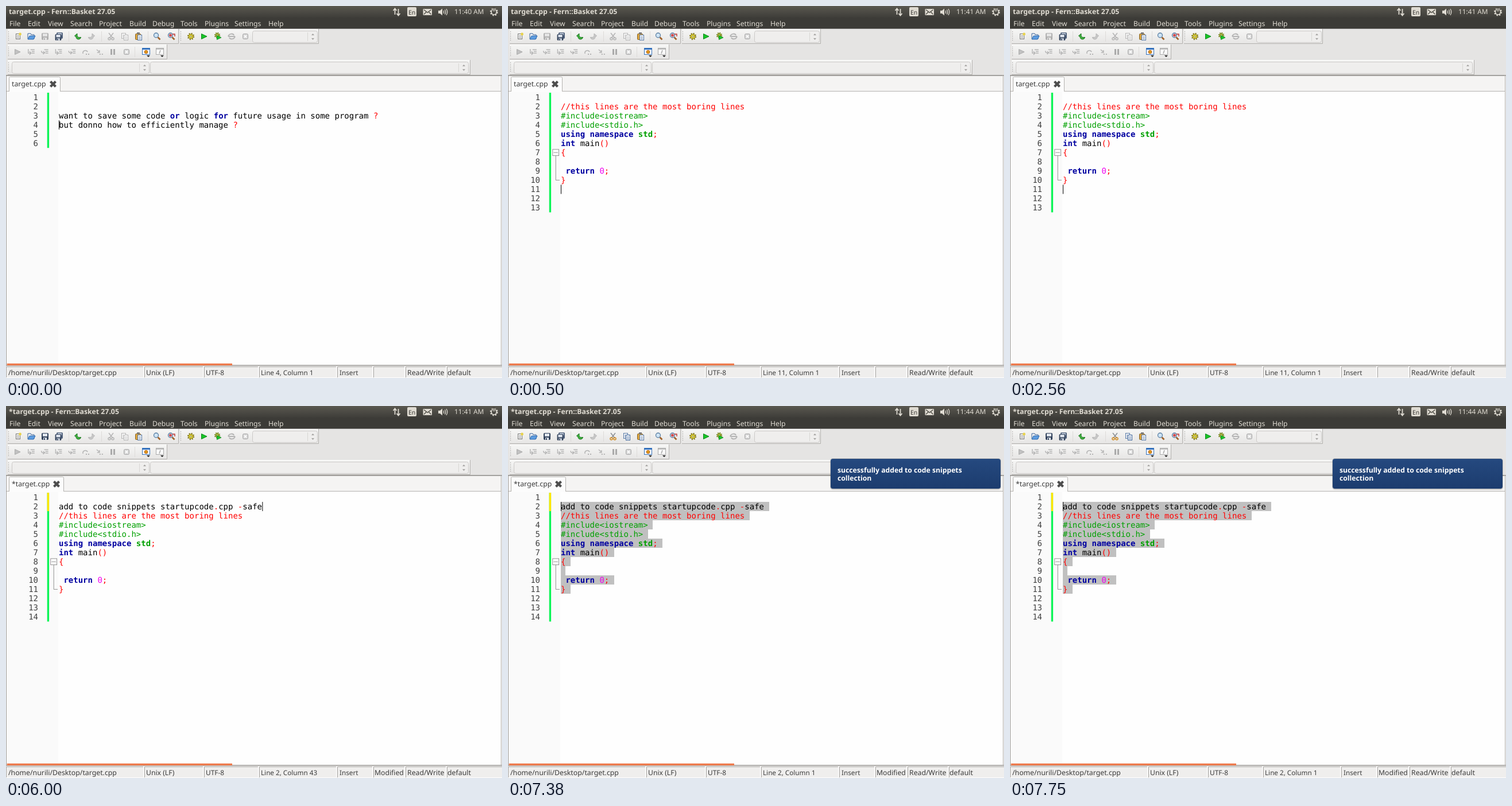
These frames come from a looping animation (864 px wide and 648 px high, 8 s). An HTML page:

```html
<!DOCTYPE html>
<html lang="en">
<head>
<meta charset="utf-8">
<title>Code editor</title>
<style>
html, body { margin: 0; width: 100%; height: 100%; overflow: hidden; background: #e5e4e3; }
svg { display: block; width: 100vw; height: 100vh; }
text { white-space: pre; font: 12.2px "Noto Sans", "Open Sans", sans-serif; fill: #3c3c3c; text-rendering: geometricPrecision; }
.bar { fill: #dfdbd2; }
.b { font-weight: bold; }
.code, .num { font: 14.015px "DejaVu Sans Mono", monospace; fill: #000; }
.num { fill: #404040; text-anchor: end; }
.kw { fill: #0000a0; font-weight: bold; }
.std { fill: #00a000; font-weight: bold; }
.pre { fill: #00a000; }
.op, .note { fill: #f00; }
.lit { fill: #f000f0; }
</style>
</head>
<body>
<svg viewBox="0 0 864 648" xmlns="http://www.w3.org/2000/svg">
  <defs>
    <linearGradient id="top" x2="0" y2="1"><stop stop-color="#5a5850"/><stop offset="1" stop-color="#3e3d39"/></linearGradient>
    <linearGradient id="tool" x2="0" y2="1"><stop stop-color="#f6f6f5"/><stop offset="1" stop-color="#e6e5e4"/></linearGradient>
    <linearGradient id="toast" x2="0" y2="1"><stop stop-color="#25497f"/><stop offset="1" stop-color="#1c3c6e"/></linearGradient>
  </defs>
  <g id="frame"></g>
  <g id="view"></g>
</svg>
<script>
// The stage shows a 1024 x 768 desktop; S converts desktop pixels to stage units
const LOOP = 8000, S = 864 / 1024;
const CELL = 10 * S, LEFT = 109 * S, ROW = 19 * S, TOP = 179 * S, BASE = 15 * S;
const GREY = '#b4b4b4';

const program = [
  '//this lines are the most boring lines',
  '#include<iostream>',
  '#include<stdio.h>',
  'using namespace std;',
  'int main()',
  '{',
  '',
  ' return 0;',
  '}'
];
const snippet = ['', 'add to code snippets startupcode.cpp -safe', ...program];

const scenes = [
  { at: 0, clock: '11:40', rows: 6, caret: [4, 1],
    lines: ['', '', 'want to save some code or logic for future usage in some program ?',
      'but donno how to efficiently manage ?'] },
  { at: 500, clock: '11:41', rows: 13, caret: [11, 1], fold: 7, lines: ['', ...program] },
  { at: 3940, clock: '11:41', rows: 14, caret: [2, 43], fold: 8, dirty: true, lines: snippet },
  { at: 7380, clock: '11:44', rows: 14, caret: [2, 1], fold: 8, dirty: true, lines: snippet,
    selected: true, toast: ['successfully added to code snippets', 'collection'] }
];

// Drawing helpers
const rect = (x, y, w, h, fill, more = '') =>
  `<rect x="${x}" y="${y}" width="${w}" height="${h}" fill="${fill}" ${more}/>`;
const frameRect = (x, y, w, h, fill, line, r = 0) =>
  rect(x + .5, y + .5, w - 1, h - 1, fill, `stroke="${line}" rx="${r}"`);
const path = (d, stroke, w = 1, fill = 'none') =>
  `<path d="${d}" stroke="${stroke}" stroke-width="${w}" fill="${fill}"/>`;
const circle = (x, y, r, fill, stroke = 'none', w = 1) =>
  `<circle cx="${x}" cy="${y}" r="${r}" fill="${fill}" stroke="${stroke}" stroke-width="${w}"/>`;
const esc = s => s.replace(/&/g, '&amp;').replace(/</g, '&lt;');
const text = (x, y, s, cls = '', size) =>
  `<text x="${x}" y="${y}" class="${cls}"${size ? ` style="font-size:${size}px"` : ''}>${s}</text>`;
const at = (x, y, body, k = 1) => `<g transform="translate(${x} ${y}) scale(${k})">${body}</g>`;
const rowTop = n => TOP + (n - 1) * ROW;

// Icons, each centred on 0,0
const gear = (fill, line, r = 4) =>
  `<circle r="${r + 1}" fill="none" stroke="${line}" stroke-width="2.4" stroke-dasharray="${(r + 1) * Math.PI / 8}"/>` +
  circle(0, 0, r, fill, line) + circle(0, 0, 1.5, '#fff', line);
const play = (fill, line) => path('M-4.5-4.5L5 0L-4.5 4.5Z', line, 1, fill);
const sheet = (x, y, line) => frameRect(x, y, 8, 10, '#fafafa', line) +
  path(`M${x + 2} ${y + 3.5}h4m-4 2h4m-4 2h4`, line, .7);
const disk = (body, label) => frameRect(-6, -6, 12, 12, body, body, 1) +
  rect(-4, -5, 8, 5, label) + rect(-3, 2, 6, 4, label) + rect(-2, 3, 2, 3, body);
const curl = (fill, line) =>
  path('M-5.5-1L-1-5V-2.5C-1 1 1 2 5.5 1.5C5 6-3 6.5-3 .8Z', line, 1, fill);
const lens = () => path('M1.5 1.5L5.5 5.5', '#a0622a', 2.6) + circle(-1.5, -2, 4, '#cfe4f4', '#5b7fa3', 1.3);
const cut = c => path('M-4-6L3 3M4-6L-3 3', c ? '#8a8f94' : GREY, 1.5) +
  circle(-3, 4, 2, 'none', c ? '#d08a20' : GREY, 1.5) + circle(3, 4, 2, 'none', c ? '#d08a20' : GREY, 1.5);
const copy = c => sheet(-6, -6, c ? '#5577a5' : GREY) + sheet(-2, -3, c ? '#3d659c' : GREY);
const stop = frameRect(-5, -5, 10, 10, '#d6d6d6', '#a8a8a8', 2) + path('M-2-2L2 2M2-2L-2 2', '#fff', 1.6);
const steps = kind => path('M-1-4h7M1-1h5M1 2h5', GREY, 1.4) +
  path(kind % 2 ? 'M-6-2C-6 2-3 2-1 1M-3-1L0 1L-3 4' : 'M-5-5V2H-1M-3-1L0 2L-3 5', GREY, 1.4);
const small = kind => path(kind ? 'M-5-4L0 0M0-3V1H-4' : 'M-5 3C-6-3 2-4 3 0', GREY, 1.5) +
  path('M0 4h2m2 0h2', GREY, 2);
const panel = (c, line) => frameRect(-7, -7, 14, 12, '#fafafa', line) + rect(-6, -6, 12, 2, c) +
  path('M1 6H7L4 9Z', 'none', 0, '#222');

function toolbar(x, y, w, h) {
  let s = rect(x, y, w, h, 'url(#tool)') +
    path(`M${x} ${y + h - .5}H${x + w - .5}V${y}`, '#b3b1ae') + path(`M${x} ${y + .5}h${w - 1}`, '#fbfbfa');
  for (let i = 4; i < h - 4; i += 3) s += rect(x + 1, y + i, 1, 1, '#8d8b88');
  return s;
}

function combo(x, y, w) {
  const a = x + w - 9;
  return frameRect(x, y, w, 21, '#efeeed', '#cbc9c7', 3) + path(`M${a - 8.5} ${y + 3}v15`, '#d8d6d4') +
    path(`M${a - 2} ${y + 8}h5l-2.5-3zm0 5h5l-2.5 3z`, 'none', 0, '#a6a4a2');
}

function trayIcons() {
  const c = '#dfdbd2', back = '#48463f';
  return path('M677.5 15V5M674.5 8L677.5 4.5L680.5 8M683.5 5V15.5M680.5 13L683.5 16.5L686.5 13', c, 1.8) +
    rect(699, 2, 16, 16, c, 'rx="2"') +
    '<text x="701" y="14.5" style="font-size:10.5px;fill:#3c3b37">En</text>' +
    rect(726.5, 5, 15.5, 11, c, 'rx="1"') +
    path('M728 6.5L734.2 11.5L740.5 6.5M728 14.5L732 10.5M740.5 14.5L736.5 10.5', back, 1.2) +
    path('M753 8H756L760 4.5V16.5L756 13H753Z', 'none', 0, c) +
    path('M762 8Q763.5 10.5 762 13M764.5 6.5Q767 10.5 764.5 14.5M767 5Q770.5 10.5 767 16', c, 1.3) +
    at(850, 10.5, circle(0, 0, 4.5, 'none', c, 1.6) +
      `<circle r="6" fill="none" stroke="${c}" stroke-width="2" stroke-dasharray="2.356"/>` +
      rect(-2, -8, 4, 7, back) + path('M0-6.5V-1', c, 1.6));
}

function drawFrame() {
  const menu = [['File', 6], ['Edit', 38], ['View', 73], ['Search', 112], ['Project', 162], ['Build', 215],
    ['Debug', 255], ['Tools', 304], ['Plugins', 346], ['Settings', 398], ['Help', 457]];
  let s = rect(0, 0, 864, 648, '#e5e4e3') + rect(0, 20, 864, 47 * S - 20, '#3c3b37') +
    rect(0, 0, 864, 24 * S, 'url(#top)') +
    menu.map(([m, x]) => text(x, 34.5, m, 'bar')).join('') + trayIcons();

  s += toolbar(3, 40, 298, 26) + toolbar(303, 40, 242, 26) + toolbar(3, 67, 278, 26) + toolbar(3, 94, 806, 26);
  s += combo(429, 43, 114) + combo(10, 97, 240) + combo(251, 97, 555);
  s += path('M109.5 44V62M166.5 44V62M247.5 44V62M224.5 71V89', '#dddbd9');

  const icons = [
    [21, sheet(-4, -5, '#777') + circle(3.5, -4, 2.4, '#e8d24a')],
    [44, path('M-6 4V-5H-1L0-3H5V4Z', '#355f96', 1, '#f4f4f4') + path('M-6 5L-3-1H7L4 5Z', '#2c68ad', 1, '#5d9ce0')],
    [92, at(1.5, -1.5, disk('#4a5c78', '#b4bfd0'), .9) + at(-1, 1.5, disk('#33435c', '#dfe5ee'), .9)],
    [125, curl('#3fae3f', '#17761c')],
    [149, `<g transform="scale(-1 1)">${curl('#c8c8c8', GREY)}</g>`],
    [231, frameRect(-6, -5, 10, 11, '#d9a441', '#8a6420', 1) + rect(-3, -7, 5, 3, '#777') + sheet(-2, -3, '#5577a5')],
    [263, lens()],
    [288, lens() + circle(-1.5, -2, 2.5, '#d34c4c') + path('M2-4H6V0', '#b33', 1.4)],
    [322, gear('#ecdf3a', '#857a18')],
    [345, play('#18c528', '#0a8a18')],
    [369, at(-1, -2, gear('#ecdf3a', '#6f8016', 3)) + at(2, 2, play('#18c528', '#0a8a18'), .8)],
    [393, path('M-6 0C-4-6 3-5 4-2M6 0C4 6-3 5-4 2M-6 0H6', GREY, 2)],
    [417, stop]
  ];
  s += icons.map(([x, body]) => at(x, 53, body)).join('');

  const debug = [play('#c2c2c2', '#aaa'), steps(0), steps(1), steps(2), steps(3), small(0), small(1)];
  s += debug.map((body, i) => at(20 + i * 23.8, 80, body)).join('') +
    at(186, 80, rect(-4, -5, 3, 10, '#ababab') + rect(1, -5, 3, 10, '#ababab')) + at(210, 80, stop) +
    at(244, 80, panel('#3572bd', '#3572bd') + circle(0, 0, 2.8, '#e4a11b', '#b05a18')) +
    at(268, 80, panel('#c2c2c2', '#aaa') + path('M1-3L-1 3', '#aaa', 1.5));

  s += rect(0, 120, 864, 508, '#f5f4f3') + rect(0, 120, 864, 2, '#a3a19e') +
    rect(0, 148, 863, 1, '#b5b3b0') + rect(2, 149, 860, 476, '#fefefe') +
    rect(2, 149, 89, 476, '#fafafa') +
    rect(0, 120, 1, 507, '#a3a19e') + rect(862, 120, 1, 507, '#b5b3b0') +
    rect(0, 625, 864, 2, '#b0aeab') + rect(2 * S, 738 * S, 465 * S, 4 * S, '#ee7a4c');

  s += rect(0, 627, 864, 21, '#efeeed');
  const edges = [0, 241, 345, 441, 577, 640, 696, 768, 866];
  for (let i = 0; i < 8; i++) {
    const x = edges[i], w = edges[i + 1] - x - 2;
    s += path(`M${x + .5} 647V628.5H${x + w}`, '#aaa8a5') + path(`M${x + w + .5} 628V647.5H${x}`, '#fff');
  }
  return s + text(4, 643, '/home/nurili/Desktop/target.cpp', '', 12.3) + text(244, 643, 'Unix (LF)') +
    text(348, 643, 'UTF-8', '', 11.9) + text(581, 643, 'Insert', '', 11.7) +
    text(699, 643, 'Read/Write', '', 12.3) + text(769, 643, 'default', '', 12.3);
}

// Syntax colouring
function colour(line) {
  const span = (cls, s) => `<tspan class="${cls}">${esc(s)}</tspan>`;
  if (line.startsWith('//')) return span('note', line);
  if (line.startsWith('#')) return span('pre', line);
  return line.replace(/\b(or|for|using|namespace|int|return)\b|\b(std)\b|(\d+)|([?.;(){}-])/g,
    (m, kw, std, lit) => span(kw ? 'kw' : std ? 'std' : lit ? 'lit' : 'op', m));
}

function drawTab(dirty) {
  const w = dirty ? 96 : 90, x = dirty ? 88 : 82;
  return path(`M5.5 149V125.5Q5.5 123.5 7.5 123.5H${w + 2.5}Q${w + 4.5} 123.5 ${w + 4.5} 125.5V149`,
    '#b5b3b0', 1, '#fcfcfc') + rect(6, 148, w - 2, 2, '#fcfcfc') +
    text(10, 140, (dirty ? '*' : '') + 'target.cpp', '', 12.3) +
    path(`M${x - 4.5} 131.5l9 9m0-9l-9 9`, '#4d4d4d', 4.2);
}

function drawFold(row) {
  const x = 83.2, y = rowTop(row) + ROW / 2, r = 5.4;
  return path(`M${x} ${y + r}V${y + 3 * ROW}H90`, '#808080', S) +
    rect(x - r, y - r, 2 * r, 2 * r, '#fff', `stroke="#808080" stroke-width="${S}"`) +
    path(`M${x - 3.8} ${y}h7.6`, '#808080', S);
}

function drawScene({ clock, rows, caret: [row, col], fold, dirty, lines, selected, toast }) {
  let s = text(5, 14, (dirty ? '*' : '') + 'target.cpp - Fern::Basket 27.05', 'bar b', 12.25) +
    text(781, 14, clock + ' AM', 'bar', 11.8) + drawTab(dirty);
  s += at(68, 53, dirty ? disk('#33435c', '#dfe5ee') : disk('#b0b0b0', '#e4e4e4')) +
    at(183, 53, cut(selected)) + at(207, 53, copy(selected));

  s += rect(85 * S, TOP, 4 * S, rows * ROW, '#0cf556');
  if (dirty) s += rect(85 * S, TOP, 4 * S, 2 * ROW, '#ffe600');
  for (let n = 1; n <= rows; n++) s += text(56, rowTop(n) + BASE, n, 'num');
  if (fold) s += drawFold(fold);

  lines.forEach((line, i) => {
    const y = rowTop(i + 1);
    if (selected && i) s += rect(LEFT, y, (line.length + 1) * CELL, ROW, '#c0c0c0', 'shape-rendering="crispEdges"');
    s += text(LEFT, y + BASE, colour(line), 'code');
  });
  s += rect(LEFT + (col - 1) * CELL, rowTop(row), 1, ROW, '#000');

  s += text(444, 643, `Line ${row}, Column ${col}`, '', 11.7);
  if (dirty) s += text(642, 643, 'Modified');
  if (toast) {
    s += rect(561, 91, 298, 55, '#000', 'rx="5" opacity=".18"') +
      rect(562, 92, 296, 52, 'url(#toast)', 'rx="4"') +
      toast.map((t, i) => `<text x="574" y="${115.5 + i * 14.5}" class="b" style="fill:#fff">${t}</text>`).join('');
  }
  return s;
}

const view = document.getElementById('view');
document.getElementById('frame').innerHTML = drawFrame();
const start = performance.now();
let shown;

function tick(now) {
  const t = Math.max(0, now - start) % LOOP;
  const scene = scenes.filter(s => s.at <= t).pop();
  if (scene !== shown) view.innerHTML = drawScene(shown = scene);
  requestAnimationFrame(tick);
}
tick(start);
</script>
</body>
</html>
```
